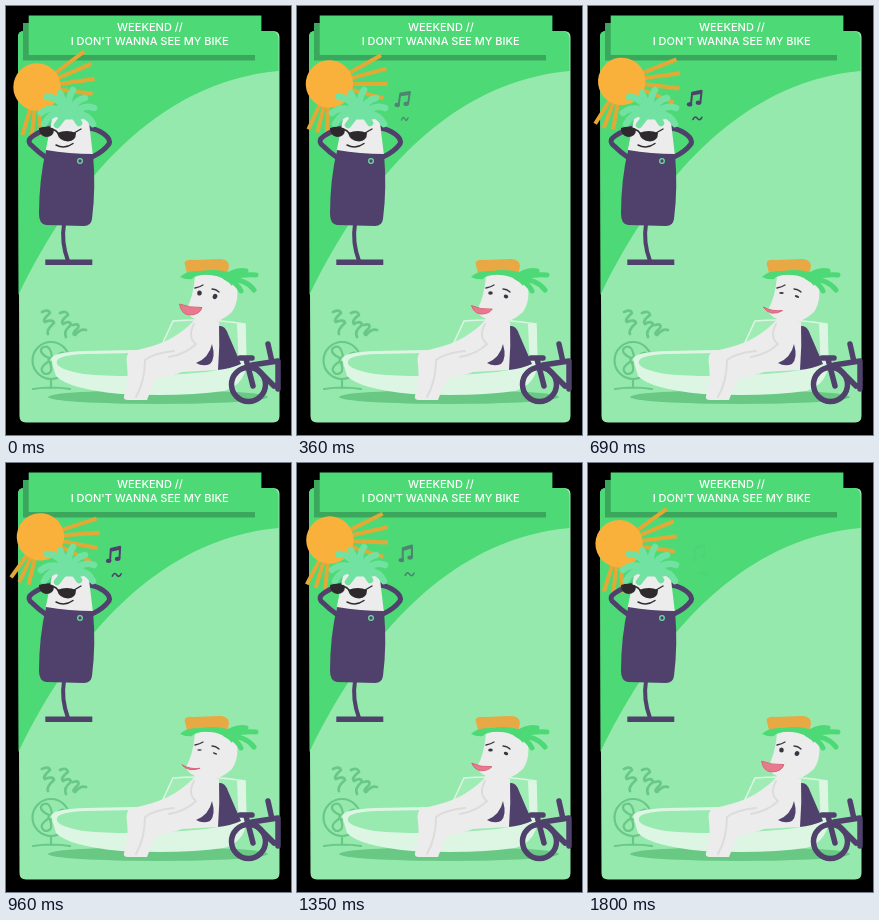
An HTML page that plays this animation: 285x429 px, repeating every 1.83 s.

```html
<!DOCTYPE html>
<html lang="en">
<head>
<meta charset="utf-8">
<title>Weekend</title>
<style>
html, body { margin: 0; width: 100%; height: 100%; overflow: hidden; background: #000; }
svg { display: block; width: 285px; height: 429px; }
text { font: 500 11px Inter, Lato, sans-serif; fill: #fff; text-anchor: middle; }
.line { fill: none; stroke-linecap: round; stroke-linejoin: round; }
.purple { fill: #4f416b; }
.skin { fill: #ececec; }
</style>
</head>
<body>
<svg viewBox="0 0 285 429">
  <!-- card -->
  <path d="M18 25H267Q273.5 25 273.5 31V410Q273.5 416.5 267 416.5H20Q13.5 416.5 13.5 410L12 31Q12 25 18 25Z" fill="#96e9ad"/>
  <path d="M18 25H266Q272 26 272.5 32V65C150 76 66 178 12.5 289L12 31Q12 25 18 25Z" fill="#4dda76"/>
  <path d="M17 17H249V54.6H17Z" fill="#3ba75c"/>
  <path d="M22.7 9.6H255.4V49H22.7Z" fill="#4dda76"/>
  <text x="144" y="24.5">WEEKEND //</text>
  <text x="143.7" y="39">I DON'T WANNA SEE MY BIKE</text>

  <g id="sun">
    <path id="rays" fill="none" stroke="#e4a836" stroke-width="4"/>
    <circle r="23.7" fill="#f9b13b"/>
  </g>

  <g id="note" class="line" stroke="#4f416b">
    <path d="M-4 7V-6L6 -9V4M-4 -4L6 -7" stroke-width="2.2"/>
    <g class="purple" stroke="none">
      <ellipse cx="-5.5" cy="7" rx="3" ry="2.3"/>
      <ellipse cx="4" cy="4.2" rx="3" ry="2.3"/>
    </g>
  </g>
  <path id="tilde" class="line" d="M-4 1Q-2 -3 0 0T4 -1" stroke="#4f416b" stroke-width="1.5"/>

  <!-- standing figure -->
  <g class="line" stroke="#4f416b" stroke-width="5">
    <path d="M42 153Q32 146 24 138Q21 134 27 130Q36 124 45 122"/>
    <path d="M86 151Q97 146 103 138Q105 133 98 128Q91 123 83 122"/>
    <path d="M58 218Q55 236 62 255" stroke-width="4"/>
  </g>
  <path class="purple" d="M39.3 253.5H86.3V259H39.3Z"/>
  <path class="skin" d="M47 108H82L87 150L39 148Z"/>
  <path class="purple" d="M40 144Q63 148 87 148Q90 182 86 213Q85 220 78 220L40 219Q33 218 33 208Q33 174 40 144Z"/>
  <circle cx="74" cy="155" r="2.3" fill="none" stroke="#6bdd9d" stroke-width="1.3"/>
  <g class="line" stroke="#72e2a3" stroke-width="6.5">
    <path d="M60 109Q46 103 38 118M60 107Q46 98 35 107M60 106Q52 90 41 91M62 104Q56 92 54 87M64 104Q61 92 67 84M66 105Q69 94 79 92M67 107Q79 98 88 102M67 109Q81 106 87 118M58 110L51 119M69 111L73 117"/>
    <path d="M55 109H75" stroke-width="9"/>
  </g>
  <g fill="#2d292c">
    <path d="M33 122Q42 119 48 123Q48 131 40 131Q33 130 33 122Z"/>
    <path d="M51 127Q61 123 70 127Q70 135 62 135.5Q53 135 51 127Z"/>
  </g>
  <path class="line" d="M46 123Q50 124 53 128M68 127L75 123M50 139Q59 143.5 67 137.5" stroke="#2d292c" stroke-width="1.4"/>

  <!-- fan and breeze -->
  <ellipse cx="152" cy="391" rx="110" ry="7" fill="#69c984"/>
  <g class="line" stroke="#69c887" stroke-width="2.2">
    <circle cx="45" cy="354.5" r="18.5"/>
    <circle cx="45" cy="354" r="2.5"/>
    <path d="M43 352Q32 347 36 342Q44 337 46 351M48 353Q57 342 61 350Q61 359 48 356M44 357Q48 368 39 368Q31 363 42 356M45 373V382M27 383Q45 380 64 383"/>
    <path d="M36 306Q43 303 44 307Q36 314 39 316Q47 313 48 317Q40 324 42 328M54 307Q61 304 62 309Q54 315 57 318Q64 314 65 319Q57 325 60 331M67 319Q74 317 72 322Q65 328 69 329Q75 322 80 324" stroke-width="2.8"/>
  </g>

  <!-- pool -->
  <path d="M152 347L167 315Q203 312 239 318L240 362H152Z" fill="#a0ecb5" stroke="#dcf6e3" stroke-width="1.5"/>
  <path d="M45 353Q46 346 80 345L128 344L241 350Q242 378 218 385Q175 391 115 388Q62 383 50 370Z" fill="#dcf6e3"/>
  <path d="M51 355Q53 349 80 348L130 347L234 348Q234 362 200 366Q130 373 78 368Q48 363 51 355Z" fill="#98eab0"/>
  <path d="M231 318H239L240 362L233 365Z" fill="#dcf6e3"/>

  <!-- bather -->
  <path class="purple" d="M213 320Q219 319 222 328L235 358Q224 363 211 364L208 350Z"/>
  <path class="skin" d="M190 312Q184 320 172 328Q155 340 125 345Q119 348 121 359Q123 374 118 390Q117 394 122 394H141Q145 382 151 372Q164 371 176 366L212 364Q214 340 213 316Z"/>
  <path class="purple" d="M190 357Q203 352 206 338Q210 352 204 358Q197 361 190 357Z"/>
  <path class="line" d="M168 345Q148 347 139 354Q139 375 130 391M188 318Q181 331 190 338Q180 348 163 351" stroke="#dcdcdc" stroke-width="2"/>
  <path class="skin" d="M189 271Q211 262 229 274Q235 292 226 306Q212 319 197 316Q182 312 180 304Q187 292 189 271Z"/>
  <path d="M178.5 257Q180 253 187 254L215 253Q223 254 223 260L221 270L181 267Z" fill="#e8a944"/>
  <path d="M174 271Q180 264 195 265Q215 262 228 269L226 280Q218 270 204 269Q190 268 186 273Q180 274 174 271Z" fill="#4dda76"/>
  <path class="line" d="M219 271Q230 263 240 265M222 272Q236 268 250 269M222 273Q240 273 248 284M222 273Q232 278 235 285" stroke="#4dda76" stroke-width="5"/>
  <path class="line" d="M189 282Q194 281 197 279M206 283Q210 283 213 286" stroke="#3b3540" stroke-width="1.3"/>
  <g fill="#3b3540">
    <ellipse id="eyeL" cx="193.5" cy="287" rx="2.3"/>
    <ellipse id="eyeR" cx="209" cy="290.5" rx="2.3" transform="rotate(22 209 290.5)"/>
  </g>
  <path id="mouth" fill="#e87a8d" stroke="#d9657c" stroke-linejoin="round"/>

  <!-- bike -->
  <clipPath id="bikeEdge"><path d="M215 325H275V405H215Z"/></clipPath>
  <g class="line" clip-path="url(#bikeEdge)" stroke="#4f416b" stroke-width="5.5">
    <circle cx="242.5" cy="378.5" r="17"/>
    <path d="M234 352H246M240 353L247 380M262 338L266 356M246 359L272 355M250 362L268 380M272 356V383"/>
  </g>
</svg>

<script>
const LOOP = 1830, STEP = 30;
const $ = id => document.getElementById(id);
const mix = (a, b, p) => a + (b - a) * p;
const set = (id, attrs) => {
  for (const k in attrs) $(id).setAttribute(k, attrs[k]);
};

// each ray: angle in degrees, outer radius
const rays = [[-37, 59], [-23, 59], [-8, 58], [7, 56], [85, 49], [96, 50], [107, 50]];
set("rays", {
  d: rays.map(([deg, r]) => {
    const a = deg * Math.PI / 180, x = Math.cos(a), y = Math.sin(a);
    return `M${x * 20} ${y * 20}L${x * r} ${y * r}`;
  }).join("")
});

function draw(t) {
  const u = t / LOOP;
  const p = 1 - Math.abs(1 - 2 * u); // out and back
  const fade = Math.min(t / 650, (LOOP - t) / 870, 1);

  set("sun", { transform: `translate(${mix(31, 34.6, p)} ${mix(81, 73.5, p)}) rotate(${20 * p})` });
  set("note", {
    transform: `translate(${mix(105, 111, u)} ${mix(94.4, 89.4, u)}) rotate(${mix(12, -4, u)}) scale(.92)`,
    opacity: fade
  });
  set("tilde", {
    transform: `translate(${mix(106, 115, u)} ${mix(113.5, 110.5, u)}) scale(${Math.min(1.1, .3 + t / 700)} 1.1)`,
    opacity: fade
  });

  const ry = mix(2.6, .6, p);
  set("eyeL", { ry });
  set("eyeR", { ry });

  const left = `${mix(173.5, 176, p)} ${mix(298, 302, p)}`;
  const right = `${mix(196, 194, p)} ${mix(301.5, 305.5, p)}`;
  set("mouth", {
    d: `M${left}Q184 ${mix(302, 307, p)} ${right}Q${mix(194, 189, p)} ${mix(309, 307, p)} ${mix(183, 184, p)} ${mix(309, 306.5, p)}Q${mix(175, 179, p)} ${mix(308, 305, p)} ${left}Z`
  });
}

let start;
function tick(now) {
  start ??= now;
  draw(Math.floor((now - start) % LOOP / STEP) * STEP);
  requestAnimationFrame(tick);
}
draw(0);
requestAnimationFrame(tick);
</script>
</body>
</html>
```
